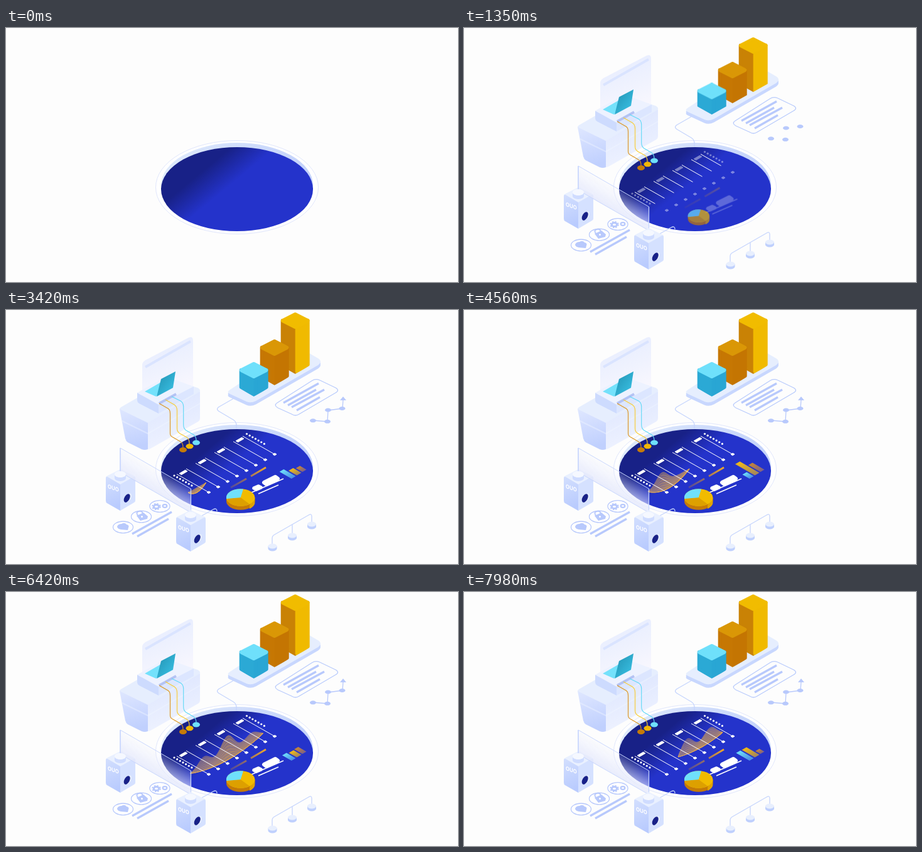
Write an HTML page that moves like this. It is 720 px wide and 405 px high and loops after 8 s.

```html
<!DOCTYPE html>
<html lang="en">
<head>
<meta charset="utf-8">
<title>Isometric data dashboard</title>
<style>
html, body { margin: 0; width: 100%; height: 100%; overflow: hidden; background: #fdfdfd; }
svg { display: block; width: 100vw; height: 100vh; }
.line { fill: none; stroke: #c6d5fd; stroke-width: 1.3; stroke-linejoin: round; }
.soft { fill: #b8c9fc; }
.strokes { fill: none; stroke: #b8c9fc; stroke-width: 3.3; }
.anim, .draw { animation: 8s linear infinite; }
.draw { stroke-dasharray: 1 1.1; }

.machine { animation-name: machine; }
.platform { animation-name: platform; }
.card { animation-name: card; }
.posts { animation-name: posts; }
.nodes { animation-name: nodes; transform-origin: 413.7px 386.5px; }
.cable { animation-name: cable; }
.trend { animation-name: trend; }
.tip { animation-name: tip; }
.rise { animation-name: rise; }
.grid { animation-name: grid; }
.marks { animation-name: marks; }
.pie { animation-name: pie; transform-origin: 374px 302px; }
.pills { animation-name: pills; }
.mini-a { animation-name: miniA; }
.mini-b { animation-name: miniB; }
.mini-c { animation-name: miniC; }

@keyframes machine { 0%, 1% { opacity: 0; transform: translateY(14px); } 6%, 100% { opacity: 1; transform: none; } }
@keyframes platform { 0%, 2.5% { opacity: 0; transform: translate(-14px, 8px); } 7%, 100% { opacity: 1; transform: none; } }
@keyframes card { 0%, 4% { opacity: 0; } 8%, 100% { opacity: 1; } }
@keyframes posts {
  0%, 2% { opacity: 0; transform: translate(38px, -24px); }
  5% { opacity: 1; }
  9% { transform: translate(6px, -4px); }
  10.2%, 100% { opacity: 1; transform: none; }
}
@keyframes nodes {
  0%, 3% { opacity: 0; transform: rotate(-95deg); }
  6% { opacity: 1; }
  9% { transform: rotate(-45.5deg); animation-timing-function: ease-out; }
  17%, 100% { opacity: 1; transform: none; }
}
@keyframes cable { 0%, 4.5% { stroke-dashoffset: 1.05; } 8.6%, 100% { stroke-dashoffset: 0; } }
@keyframes trend { 0%, 20% { stroke-dashoffset: 1.05; } 26%, 100% { stroke-dashoffset: 0; } }
@keyframes tip { 0%, 25% { opacity: 0; } 27%, 100% { opacity: 1; } }
@keyframes rise {
  0%, 10.5% { opacity: 0; transform: translateY(var(--h)); animation-timing-function: ease-out; }
  11% { opacity: 1; }
  20%, 100% { opacity: 1; transform: none; }
}
@keyframes grid { 0%, 11% { stroke-dashoffset: 1.05; } 20%, 100% { stroke-dashoffset: 0; } }
@keyframes marks { 0%, 14% { opacity: 0; } 21%, 100% { opacity: 1; } }
@keyframes pie { 0%, 12% { opacity: 0; transform: scale(.2); } 19%, 100% { opacity: 1; transform: none; } }
@keyframes pills { 0%, 15% { opacity: 0; transform: translate(-9px, 5px); } 22%, 100% { opacity: 1; transform: none; } }
@keyframes miniA {
  0%, 19% { transform: scaleX(0); } 28.1% { transform: scaleX(27); } 43% { transform: scaleX(22); }
  57% { transform: scaleX(13); } 71.3% { transform: scaleX(24); } 89.3% { transform: scaleX(10); } 100% { transform: scaleX(25); }
}
@keyframes miniB {
  0%, 19% { transform: scaleX(0); } 28.1% { transform: scaleX(38); } 42% { transform: scaleX(14); }
  57% { transform: scaleX(36); } 71.3% { transform: scaleX(16); } 89.3% { transform: scaleX(13); } 100% { transform: scaleX(24); }
}
@keyframes miniC {
  0%, 19% { transform: scaleX(0); } 28.1% { transform: scaleX(6); } 43% { transform: scaleX(12); }
  57% { transform: scaleX(22); } 71.3% { transform: scaleX(10); } 89.3% { transform: scaleX(20); } 100% { transform: scaleX(9); }
}
</style>
</head>
<body>
<svg viewBox="0 0 720 405" preserveAspectRatio="none">
  <defs>
    <linearGradient id="pool" gradientUnits="userSpaceOnUse" x1="312" y1="229" x2="341" y2="264">
      <stop stop-color="#182187"/><stop offset="1" stop-color="#2433cb"/>
    </linearGradient>
    <linearGradient id="rim"><stop stop-color="#e0ebfc"/><stop offset="1" stop-color="#c3d2fb"/></linearGradient>
    <linearGradient id="screen" x2=".3" y2="1">
      <stop stop-color="#e4ebff"/><stop offset=".55" stop-color="#eff2fe"/><stop offset="1" stop-color="#faf8fe"/>
    </linearGradient>
    <linearGradient id="shade" x2=".2" y2="1"><stop stop-color="#d3dffe"/><stop offset="1" stop-color="#b9cbfe"/></linearGradient>
    <linearGradient id="hull" x2=".2" y2="1"><stop stop-color="#dfe7ff"/><stop offset="1" stop-color="#c0d0fe"/></linearGradient>
    <linearGradient id="light" x2=".3" y2="1"><stop stop-color="#dbe4fe"/><stop offset="1" stop-color="#eef2ff"/></linearGradient>
    <linearGradient id="sheet" x2="1" y2="1"><stop stop-color="#2190b0"/><stop offset="1" stop-color="#3cc6ea"/></linearGradient>
    <linearGradient id="glass" gradientUnits="userSpaceOnUse" x1="238" y1="252" x2="221" y2="281">
      <stop stop-color="#e9edff" stop-opacity=".1"/><stop offset="1" stop-color="#e4e8fb" stop-opacity=".85"/>
    </linearGradient>
    <linearGradient id="streak" gradientUnits="userSpaceOnUse" x1="357" y1="0" x2="415" y2="0">
      <stop stop-color="#d58a1c" stop-opacity=".25"/><stop offset="1" stop-color="#f2aa28"/>
    </linearGradient>
    <linearGradient id="wave" gradientUnits="userSpaceOnUse" y1="0" y2="0">
      <stop stop-color="#f0b254" stop-opacity=".65"/><stop offset=".5" stop-color="#f6b53c"/><stop offset="1" stop-color="#f4b040" stop-opacity=".8"/>
    </linearGradient>
    <linearGradient id="cyanFade"><stop stop-color="#6fe0fb"/><stop offset="1" stop-color="#6fe0fb" stop-opacity=".5"/></linearGradient>
    <linearGradient id="goldFade"><stop stop-color="#f3bb14"/><stop offset="1" stop-color="#f3bb14" stop-opacity=".6"/></linearGradient>
    <linearGradient id="rustFade"><stop stop-color="#c98733"/><stop offset="1" stop-color="#b98157" stop-opacity=".6"/></linearGradient>

    <path id="slab" d="M357 127L455 63Q463 58 471 62L497 77Q505 82 497 88L398 145Q390 149 383 146L357 134Q350 131 357 127Z"/>
    <g id="post">
      <path fill="url(#shade)" d="M159 268Q159 264 163 266L182 277V320L161 308Q159 307 159 304Z"/>
      <path fill="#d5e1ff" d="M182 277L202 266Q206 264 206 268V304Q206 306 204 307L182 320Z"/>
      <path fill="#e9f0ff" d="M160 265L182 254L205 265L182 278Z"/>
      <path fill="#cfdcff" d="M173 262V268A9 5 0 0 0 191 268V262Z"/>
      <ellipse cx="182" cy="262" rx="9" ry="5" fill="#f5f8ff"/>
      <ellipse cx="195" cy="299" rx="4.4" ry="7.4" fill="#e6eeff" transform="rotate(28 195 299)"/>
      <ellipse cx="192.7" cy="300" rx="4.1" ry="7.4" fill="#182188" transform="rotate(28 192.7 300)"/>
      <text transform="matrix(.866 .3 0 1 162 284)" font-family="Inter, sans-serif" font-size="9" font-weight="700" fill="#fff">OUO</text>
    </g>
    <g id="node">
      <path fill="#bfd0fd" d="M-7-2V2A7 4 0 0 0 7 2V-2Z"/>
      <ellipse cy="-2" rx="7" ry="4" fill="#e8effe"/>
    </g>
  </defs>

  <g id="basin">
    <ellipse cx="368" cy="254" rx="129.5" ry="74.5" fill="#fff" stroke="#e0e6fc"/>
    <ellipse cx="368" cy="250.5" rx="121" ry="67.5" fill="url(#rim)"/>
    <ellipse cx="368" cy="257" rx="121" ry="67" fill="url(#pool)"/>
  </g>

  <g class="anim machine">
    <path fill="url(#screen)" d="M217 88Q217 83 222 80L291 44Q298 41 298 49V137L262 150L217 131Z"/>
    <path d="M222 91L294 50" fill="none" stroke="#dae4ff" stroke-width="4"/>
    <path fill="#e6eefe" d="M183 155L258 112Q262 110 267 112L305 124Q312 127 307 133L226 181L183 160Q179 158 183 155Z"/>
    <path fill="url(#hull)" d="M181 158L226 180V222Q221 224 216 222L194 211Q191 209 190 205Z"/>
    <path fill="url(#light)" d="M226 180L309 130V173Q309 176 306 178L230 221Q228 222 226 222Z"/>
    <path d="M185 177L226 197L309 149" fill="none" stroke="#f1f5ff" stroke-opacity=".4" stroke-width="2"/>
    <path fill="#edf2ff" d="M209 132L255 106L299 122L243 151Z"/>
    <path fill="#cddbfe" d="M209 132L243 151V165L212 149Q209 147 209 144Z"/>
    <path fill="#dce6ff" d="M243 151L299 122V134L243 165Z"/>
    <path fill="#74e1fb" d="M221 130L247 115L250 124L239 138Z"/>
    <path fill="url(#sheet)" d="M247 110L270 98L266 124L240 138Z"/>
    <path d="M244 149L271 134" stroke="#b4c3f4" stroke-width="4"/>
  </g>
  <g fill="none" stroke-width="1.15">
    <path class="draw cable" pathLength="1" stroke="#dc961f" d="M244 149L258 157Q261.5 159 261.5 165V197Q261.5 201 266 203L278 210Q282 212 282 219V222"/>
    <path class="draw cable" pathLength="1" stroke="#f8cc35" d="M254 143L268 151Q272.5 154 272.5 160V189Q272.5 194 277 197L288 203Q292 206 292 212V216"/>
    <path class="draw cable" pathLength="1" stroke="#62d9f6" d="M264 138L278 145Q282.7 148 282.7 154V183Q282.7 189 287 192L299 199Q303 202 303 208V211"/>
  </g>
  <g class="anim card">
    <ellipse cx="282" cy="223" rx="6" ry="4" fill="#c67b09"/>
    <ellipse cx="292.5" cy="217.3" rx="6" ry="4" fill="#f2b705"/>
    <ellipse cx="303" cy="211.5" rx="6" ry="4" fill="#6fe0fb"/>
  </g>

  <path class="line draw cable" pathLength="1" d="M368 138L340 154Q333 158 340 162L362 175Q367 178 367 184V189"/>
  <g class="anim platform">
    <use href="#slab" y="5.5" fill="#c8d7fe"/>
    <use href="#slab" y="3" fill="#c8d7fe"/>
    <use href="#slab" fill="#e6eefe"/>
  </g>
  <g id="columns"></g>

  <g class="anim card">
    <path class="line" style="stroke:#b9cbfc" d="M432 148L487 113Q493 109 500 112L525 124Q532 128 525 132L467 166Q461 170 455 166L433 156Q426 152 432 148Z"/>
    <path class="strokes" d="M442 148L498 117M449 152L494 127M455 155L507 127M463 160L500 139"/>
    <g class="soft">
      <ellipse cx="489" cy="176.3" rx="5" ry="3"/><ellipse cx="512" cy="177.8" rx="5" ry="3"/>
      <ellipse cx="513" cy="159.5" rx="5" ry="3"/><ellipse cx="535.5" cy="157" rx="5" ry="3"/>
    </g>
  </g>
  <path class="line draw trend" style="stroke:#b8c9fc" pathLength="1" d="M489 176L512 178L513 160L536 157L537 143"/>
  <path class="soft anim tip" d="M537 138L542 144H532Z"/>

  <g id="waves" fill="url(#wave)" stroke="url(#wave)" stroke-width=".6"></g>
  <g id="chart" fill="#fff"></g>
  <g class="anim pills">
    <path d="M358 283L383 269M390 265L414 251" stroke="url(#streak)" stroke-width="3"/>
    <g stroke="#fff" fill="#fff" stroke-linejoin="round">
      <path d="M395 284L402 281L406 283L399 286Z" stroke-width="5.5"/>
      <path d="M411 275L429 266L433 269L415 278Z" stroke-width="6"/>
      <path d="M391 291L442 269M402 293L434 279" stroke-width="1.8"/>
    </g>
  </g>

  <g class="anim pie">
    <path fill="#c57a06" d="M351 299V305A22.7 13.7 0 0 0 396.4 305V299Z"/>
    <path fill="#e0a200" d="M388 311V317A22.7 13.7 0 0 0 396.4 305V299Z"/>
    <ellipse cx="373.7" cy="299" rx="22.7" ry="13.7" fill="#f1bb00"/>
    <path fill="#dda000" d="M373.7 299L351.2 301A22.7 13.7 0 0 0 388 309.5Z"/>
    <path fill="#6fe0fb" d="M373.7 299L351.2 301A22.7 13.7 0 0 1 378 285.5Z"/>
  </g>

  <g transform="matrix(.866 .5 -.866 .5 478.5 254.5)"><rect class="anim mini-c" x="-1" width="1" height="7.5" fill="url(#rustFade)"/></g>
  <g transform="matrix(.866 .5 -.866 .5 470.5 259.5)"><rect class="anim mini-b" x="-1" width="1" height="8.5" fill="url(#goldFade)"/></g>
  <g transform="matrix(.866 .5 -.866 .5 461.5 265)"><rect class="anim mini-a" x="-1" width="1" height="8" fill="url(#cyanFade)"/></g>

  <g class="anim nodes">
    <path class="line" d="M424 376V364Q424 360 428 358L482 327Q487 324 487 329V341M456 342V359"/>
    <use href="#node" x="424.5" y="378.5"/><use href="#node" x="456" y="361.5"/><use href="#node" x="487" y="343.5"/>
  </g>

  <g class="anim posts">
    <path class="line" d="M312 328L330 318Q336 315 336 321"/>
    <use href="#post"/>
    <path fill="url(#glass)" stroke="#c8d6fd" d="M182 220L294.5 285V323L188 262H182Z"/>
    <path class="line" d="M182 220V262M294.5 285V326"/>
    <ellipse cx="182" cy="262" rx="9" ry="5" fill="#f5f8ff"/>
    <use href="#post" x="112" y="65"/>
    <g fill="#fff" stroke="#b8c9fc" stroke-width="1.3">
      <ellipse cx="186.5" cy="346.3" rx="16" ry="9.3"/><ellipse cx="215.5" cy="329.5" rx="16" ry="9.3"/><ellipse cx="245" cy="313" rx="16" ry="9.3"/>
    </g>
    <path class="soft" d="M177 345Q179 341 184 341Q189 338 192 342Q197 343 195 347L194 351L183 350Q177 349 177 345Z"/>
    <path class="soft" d="M208 328L219 323L226 329L225 333L214 336Z"/>
    <path d="M210 328Q206 322 212 321Q217 320 218 325" fill="none" stroke="#b8c9fc" stroke-width="2"/>
    <circle cx="216.5" cy="329.5" r="1.5" fill="#fff"/>
    <g fill="none" stroke="#b8c9fc">
      <ellipse cx="239.5" cy="313.5" rx="4.2" ry="3" stroke-width="3"/>
      <ellipse cx="239.5" cy="313.5" rx="6.4" ry="4.6" stroke-width="2" stroke-dasharray="2.2 2.2"/>
      <ellipse cx="253" cy="312.5" rx="3.3" ry="2.3" stroke-width="2.2"/>
    </g>
    <path class="strokes" d="M201 357L264 322M209 361L259 333"/>
  </g>
</svg>

<script>
const LOOP = 8000;
const get = id => document.getElementById(id);

// Rising columns: centre x, top y, height, face colours
const column = (x, y, h, top, left, right, i) => `
  <clipPath id="floor${i}"><path d="M${x - 24} 0V${y + h + 12.5}L${x} ${y + h + 26}L${x + 24} ${y + h + 12.5}V0Z"/></clipPath>
  <g clip-path="url(#floor${i})"><g class="anim rise" style="--h:${h}px" stroke-width="6" stroke-linejoin="round">
    <path fill="${left}" stroke="${left}" d="M${x - 20} ${y + 13}L${x} ${y + 24}V${y + h + 23}L${x - 20} ${y + h + 11}Z"/>
    <path fill="${right}" stroke="${right}" d="M${x + 3} ${y + 25}L${x + 20} ${y + 13}V${y + h + 11}L${x + 3} ${y + h + 22}Z"/>
    <path fill="${top}" stroke="${top}" d="M${x - 19.7} ${y + 13}L${x} ${y + 3}L${x + 19.7} ${y + 13}L${x} ${y + 23}Z"/>
  </g></g>`;
get('columns').innerHTML =
  column(460.7, 4, 72, '#f1bc00', '#c98205', '#f0ba00', 0) +
  column(427.7, 47, 47, '#da9706', '#c67703', '#c47502', 1) +
  column(394.7, 83, 29, '#6fe0fb', '#2ba9d5', '#29a6d4', 2);

// Chart grid inside the basin
let grid = '', marks = '';
for (let i = 0; i < 8; i++) {
  const x = 323 + 15 * i, y = 290.7 - 8.66 * i;
  grid += `<path class="draw grid" pathLength="1" d="M${x - 51} ${y - 29}L${x} ${y}" stroke="#fff" stroke-width="1"/>`;
  marks += `<path d="M${x - 3} ${y}l3.2-1.8 2.8 1.8-3.2 1.9Z" stroke="#fff"/>`;
  if (i % 2 === 0) marks += `<path d="M${x - 47} ${y - 30}l9.5-5.5 3.5 2-9.5 5.5Z" stroke="#fff"/>`;
}
for (let i = 0; i < 7; i++) {
  marks += `<circle cx="${268 + 4.65 * i}" cy="${264 + 2.65 * i}" r="1.6"/><circle cx="${383.5 + 4.65 * i}" cy="${197.5 + 2.65 * i}" r="1.6"/>`;
}
get('chart').innerHTML = `${grid}<g class="anim marks">${marks}</g>`;

// Travelling wave: a moving window over three humps that swell as its front passes
const LAYERS = 7;
get('waves').innerHTML = Array.from({ length: LAYERS }, (_, k) =>
  `<path fill-opacity="${k ? 0.06 : 0.42}" stroke-opacity=".7"/>`).join('');
const layers = [...get('waves').children];
// Time, window start, window end, depth below the baseline
const span = [[2600, 288, 289, 4], [4560, 293, 359, 13], [5700, 286, 403, 15], [7140, 301, 416, 8], [8000, 342, 412, 5]];
const humps = [[314, 19, 13], [353, 27, 14], [394, 29, 15]];
const clamp = v => Math.min(1, Math.max(0, v));
const base = x => 291 - 0.55 * (x - 290);
const height = (x, end) => humps.reduce((sum, [c, amp, w]) =>
  sum + amp * clamp((end - c - 8) / 14) * Math.exp(-(((x - c) / w) ** 2)), 0);

function windowAt(t) {
  const i = span.findIndex(([end]) => t < end);
  if (i < 1) return null;
  const [from, to] = [span[i - 1], span[i]];
  const p = (t - from[0]) / (to[0] - from[0]);
  return from.map((v, j) => v + (to[j] - v) * p).slice(1);
}

function wavePath([a, b, depth], k) {
  const top = [], bottom = [];
  for (let i = 0; i <= 40; i++) {
    const p = i / 40, x = a + (b - a) * p;
    const arc = Math.max(0, Math.sin(Math.PI * p));
    const low = base(x) + depth * arc ** 0.8;
    const high = base(x) - height(x, b) * arc ** 0.45;
    top.push(`${x} ${high + (low - high) * k / LAYERS}`);
    bottom.unshift(`${x} ${low}`);
  }
  return `M${top.join('L')}L${bottom.join('L')}Z`;
}

function frame() {
  const range = windowAt(performance.now() % LOOP);
  get('waves').style.display = range ? '' : 'none';
  if (range) {
    get('wave').setAttribute('x1', range[0]);
    get('wave').setAttribute('x2', range[1]);
    layers.forEach((path, k) => path.setAttribute('d', wavePath(range, k)));
  }
  requestAnimationFrame(frame);
}
requestAnimationFrame(frame);
</script>
</body>
</html>
```
